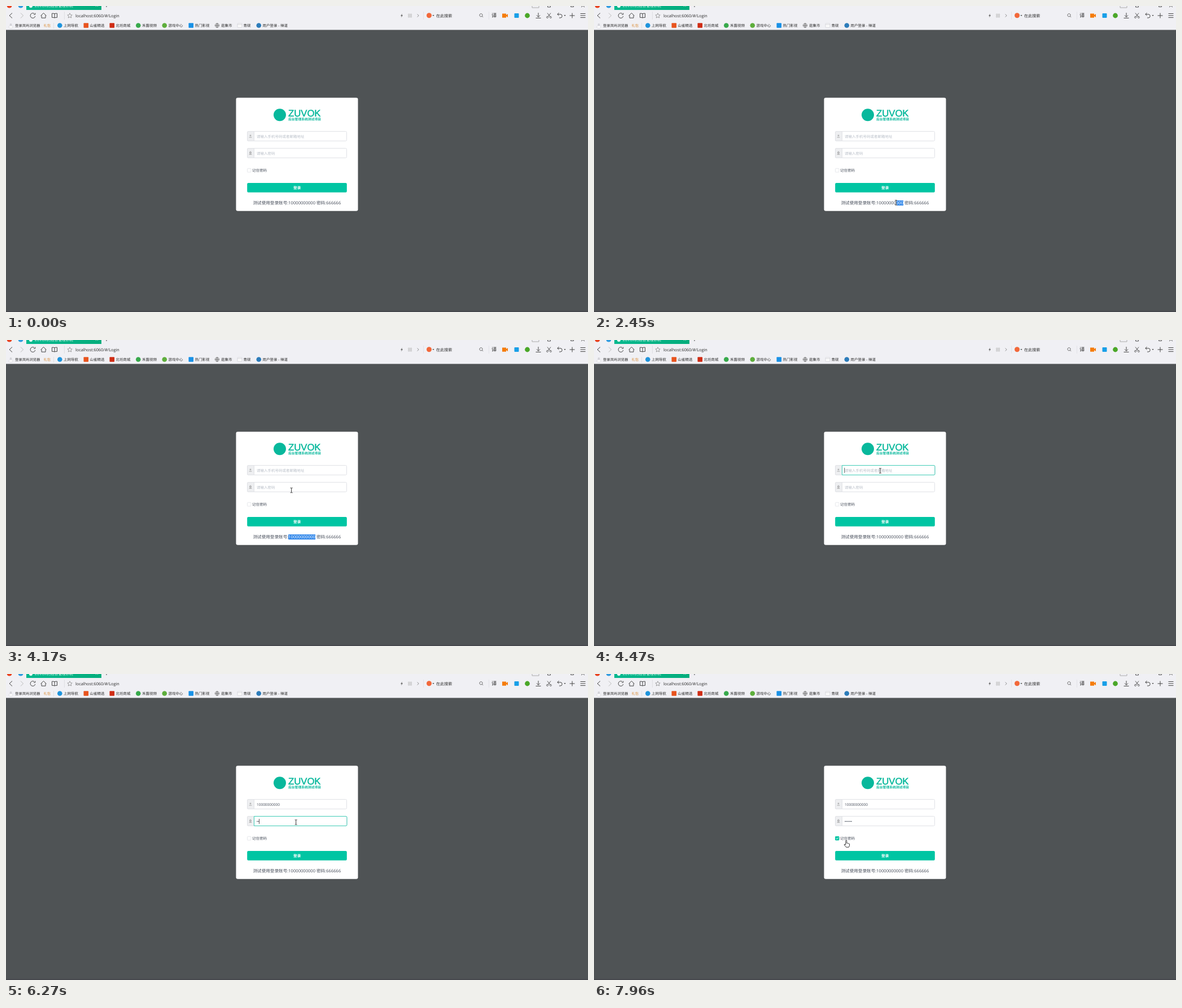
These frames come from a looping animation (1031x543 px, 8000 ms). An HTML page with a canvas:

```html
<!DOCTYPE html>
<html lang="zh-CN">
<head>
<meta charset="utf-8">
<style>
html, body { margin: 0; width: 100%; height: 100%; overflow: hidden; background: #4f5355; }
canvas { display: block; }
</style>
</head>
<body>
<canvas id="stage" width="1031" height="543"></canvas>
<script>
const ctx = document.getElementById('stage').getContext('2d');
const LOOP = 8000, STEP = 78;
const FONT = '"Open Sans", "Noto Sans CJK SC", "Noto Sans CJK", sans-serif';
const TEAL = '#00c5a3', BRAND = '#08b89c', INK = '#434a57', DARK = '#2c2c2c', PALE = '#b9bfc8';
const LINE = '#e0e2e6';
const PHONE = '10000000000';
const PHONE_X = 500.2, DIGIT = 4.35;

const clamp = v => Math.max(0, Math.min(1, v));
const ramp = (t, a, b) => clamp((t - a) / (b - a));
const mix = (a, b, k) => a + (b - a) * k;

function text(s, x, yMid, size, color, weight = 400, family = FONT) {
  ctx.font = `${weight} ${size}px ${family}`;
  ctx.fillStyle = color;
  ctx.fillText(s, x, yMid + size * 0.37);
}
function box(x, y, w, h, r, fill, stroke, width = 1) {
  ctx.beginPath();
  ctx.roundRect(x, y, w, h, r);
  if (fill) { ctx.fillStyle = fill; ctx.fill(); }
  if (stroke) { ctx.strokeStyle = stroke; ctx.lineWidth = width; ctx.stroke(); }
}
function dot(x, y, r, fill) {
  ctx.fillStyle = fill;
  ctx.beginPath();
  ctx.arc(x, y, r, 0, 7);
  ctx.fill();
}
function icon(x, y, path, color = '#444', width = 1, fill) {
  const p = new Path2D(path);
  ctx.save();
  ctx.translate(x, y);
  if (fill) { ctx.fillStyle = fill; ctx.fill(p); }
  if (color) { ctx.strokeStyle = color; ctx.lineWidth = width; ctx.stroke(p); }
  ctx.restore();
}

function drawTabs() {
  dot(6, -1, 4.5, '#e8401c');
  dot(26, -1, 4.5, '#2f9be0');
  const g = ctx.createLinearGradient(36, 0, 169, 0);
  g.addColorStop(0, '#06b98f');
  g.addColorStop(1, '#04ad7c');
  ctx.fillStyle = g;
  ctx.fillRect(36, 0, 133, 7);
  dot(44, 0, 3, '#fff');
  text('ZUVOK的后台管理系统', 51, -0.8, 6.6, '#fff');
  icon(161, -1, 'M-2-2L2 2M2-2L-2 2', '#fff', 0.8);
  icon(178, -1, 'M-3 0H3M0-3V3');
  icon(938, 0, 'M-6-3V3H6V-3', '#aaa');
  icon(962, 0, 'M-2.5-3V2H2.5V-3', '#555');
  icon(1003, 0, 'M-2.5-3V1.5H2.5V-3', '#555');
  icon(1022, 0, 'M-3-3L3 2M3-3L-3 2', '#555');
}

function drawToolbar() {
  const y = 17;
  icon(9, y, 'M2-4.5L-3 0L2 4.5');
  icon(28, y, 'M-2-4.5L2.5 0L-2 4.5', '#bbb');
  icon(47.5, y, 'M2.5-3.6A4.4 4.4 0 1 0 4.3 1M4.3-4.5V-2H1.6');
  icon(66.5, y, 'M-5 .3L0-4.5L5 .3M-3.5-.5V4.2H3.5V-.5');
  icon(86, y, 'M0-3.2Q-2-4.2-4.5-3.8V3.4Q-2 3 0 4Q2 3 4.5 3.4V-3.8Q2-4.2 0-3.2V4');
  icon(103.5, y, 'M0-7V7', '#dedee3');
  icon(113, y, 'M0-4.2L1.3-1.3L4.2-1L2 1L2.7 4L0 2.5L-2.7 4L-2 1L-4.2-1L-1.3-1.3Z', '#888', 0.8);
  text('localhost:6060/#/Login', 123, y + 0.2, 7.3, DARK);
  icon(701, y, 'M1-3.5L-2 .6H0L-1 3.5L2-.8H0Z', null, 0, '#555');
  icon(715.5, y, 'M-2.8-2.8H-.5V-.5H-2.8ZM.8-2.8H3V-.5H.8ZM-2.8.8H-.5V3H-2.8ZM.8.8H3V3H.8Z', '#bbb', 0.8);
  icon(730, y, 'M-1.5-2.5L1.2 0L-1.5 2.5', '#888', 0.9);
  icon(739.5, y, 'M0-7V7M116-7V7', '#e2e2e7');
  dot(749.5, 16.8, 4.5, '#f2683a');
  icon(757, y, 'M-1.6-1H1.6L0 1Z', null, 0, '#444');
  text('在此搜索', 762, y, 7.1, DARK);
  icon(841.5, 16.3, 'M2.6 0A2.6 2.6 0 1 1 2.6-.1M1.8 1.8L3.6 3.6', '#555', 0.9);
  text('译', 860, y, 9.4, '#222');
  icon(884, y, 'M-5-3.5H2V-1L5-3V3.2L2 1V3.8H-5Z', null, 0, '#f57c0b');
  box(900.5, 13, 8, 8, 1, '#189fe8');
  dot(923.5, 17, 4.4, '#4aa728');
  icon(943, y, 'M0-5V2.5M-3-.5L0 2.5L3-.5M-4.5 4.4H4.5');
  icon(962, y, 'M-3-4.5L2 2M3-4.5L-2 2M-1.5 3A1.5 1.5 0 1 1-1.5 2.9M4.3 3A1.5 1.5 0 1 1 4.3 2.9', '#444', 0.9);
  icon(981, y, 'M-1.5-5L-4.2-2.3L-1.5 0M-4.2-2.3H1A3 3 0 0 1 1 4H-1');
  icon(990, y, 'M-1.6-1H1.6L0 1Z', null, 0, '#444');
  icon(1003, y, 'M-4.5 0H4.5M0-4.5V4.5');
  icon(1022, y, 'M-4.5-3.5H4.5M-4.5 0H4.5M-4.5 3.5H4.5');
}

function drawBookmarks() {
  const y = 34.8, size = 6.5;
  dot(8.5, 33, 2, '#d3d3d8');
  box(5, 35.2, 7, 4, 2, '#fff', '#d3d3d8', 0.7);
  text('登录岚屿浏览器', 16, y - 0.4, 6.35, DARK);
  text('礼包', 66.5, y, 6.3, '#d9862a');
  icon(84.5, y, 'M0-5V5', '#dedee3');
  const marks = [['上网导航', 102, '#1e94dc', 1], ['山雀精选', 148.5, '#e8541e', 0],
    ['北坊商城', 194.5, '#cf2d15', 0], ['禾露视频', 241, '#37a94b', 1],
    ['游戏中心', 287.5, '#5eae3c', 1], ['热门影视', 334.5, '#1991e6', 0],
    ['逛集市', 381, null], ['青砚', 420.5, null], ['用户登录 - 禅道', 454.5, '#2c7cba', 1]];
  for (const [name, x, color, round] of marks) {
    text(name, x, y, size, DARK);
    if (!color) continue;
    if (round) dot(x - 6.7, y - 0.3, 4.3, color);
    else box(x - 11, 30.2, 8.6, 8.6, 1, color);
  }
  icon(374, 34.5, 'M3.7 0A3.7 3.7 0 1 1 3.7-.1M-3.7 0H3.7M0-3.7V3.7M0-3.7Q-3.4 0 0 3.7Q3.4 0 0-3.7', '#666', 0.7);
  box(410, 31, 8, 7, 1, '#fbfbfb', '#cfcfd4', 0.7);
  icon(410, 33, 'M0 0H8', '#cfcfd4', 0.8);
}

function drawInput(y, glow) {
  box(427.5, y + 0.5, 176, 17, 2, '#fff', LINE);
  box(427.5, y + 0.5, 12, 17, [2, 0, 0, 2], '#eeeff1', LINE);
  if (glow > 0.01)
    box(439.5, y + 0.5, 164.5, 17, [0, 2, 2, 0], null, `rgba(64,204,182,${glow})`);
}
function caret(x, y) {
  ctx.fillStyle = '#333';
  ctx.fillRect(x, y - 4.5, 0.8, 9);
}

function drawTitle() {
  dot(485, 193.3, 11, BRAND);
  text('ZUVOK', 500, 190.2, 16.7, BRAND, 400, '"Liberation Sans", Arial, sans-serif');
  ctx.strokeStyle = BRAND;
  ctx.lineWidth = 0.5;
  ctx.strokeText('ZUVOK', 500, 190.2 + 16.7 * 0.37);
  text('后台管理系统测试项目', 500, 201.2, 5.8, BRAND, 700);
}

function drawForm(t) {
  box(407.5, 162.7, 216, 201, 3, '#fff');
  drawTitle();

  const userGlow = ramp(t, 4310, 4400) - ramp(t, 5170, 5350);
  const passGlow = 0.6 * ramp(t, 4780, 4870) + 0.4 * ramp(t, 5170, 5250) - ramp(t, 7580, 7700);
  drawInput(222, userGlow);
  drawInput(252, passGlow);
  icon(433, 231, 'M-1-1.2A1 1 0 1 1 1-1.2A1 1 0 1 1-1-1.2M-2.4 2H2.4', '#888', 0.7);
  icon(433, 261, 'M-1.2-.5V-1.6A1.2 1.2 0 0 1 1.2-1.6V-.5M-2-.4H2M-1.6 1H1.6M-2.4 2.4H2.4', '#888', 0.7);

  const pasted = t >= 4690;
  text(pasted ? PHONE : '请输入手机号码或者邮箱地址', 444, 231.4, 6.5, pasted ? INK : PALE);
  if (t >= 4390 && t < 5170) caret(pasted ? 485.5 : 443.4, 231.3);

  const typed = [6040, 6190, 6410, 6580, 6810, 7040].filter(k => t >= k).length;
  if (!typed) text('请输入密码', 444, 261.5, 6.5, PALE);
  for (let i = 0; i < typed; i++) dot(445 + i * 2.2, 261.6, 0.8, INK);
  if ((t >= 5170 && t < 5730) || (t >= 6040 && t < 7580))
    caret(typed ? 443.8 + typed * 2.2 : 443.4, 261.5);

  const checked = t >= 7580;
  box(427.5, 288.3, 6.6, 6.6, 1, checked ? TEAL : '#fff', checked ? TEAL : LINE, 0.8);
  if (checked) icon(430.8, 291.6, 'M-2 0L-.5 1.5L2-1.4', '#fff', 1);
  text('记住密码', 436, 291.5, 6.5, INK);
  box(427.2, 314, 176.6, 16.7, 2, TEAL);
  text('登录', 509, 322.2, 6.7, '#fff', 700);
  text(`测试使用登录账号:${PHONE} 密码:666666`, 437.5, 349.5, 7.6, INK);
}

function drawSelection(t, x) {
  if (t < 2220 || t >= 4390) return;
  const first = t >= 3000 ? 0 : Math.max(0, Math.round((x - PHONE_X) / DIGIT));
  const left = PHONE_X + first * DIGIT, right = PHONE_X + PHONE.length * DIGIT;
  ctx.fillStyle = '#2f86ea';
  ctx.fillRect(left, 345, right - left, 9);
  text(PHONE.slice(first), left, 349.5, 7.6, '#fff');
}
function drawPopup(t) {
  if (t < 3480 || t >= 4010) return;
  ctx.fillStyle = 'rgba(0,0,0,.25)';
  ctx.fillRect(502, 326, 62, 16);
  box(500.5, 324.5, 62, 16.5, 0, '#fff', '#999', 0.8);
  icon(531.5, 325, 'M0 0V16', '#bbb', 0.8);
  text('搜索', 508, 333, 7.7, DARK);
  text('复制', 539, 333, 7.7, DARK);
}

// Pointer legs: start, end, x0, y0, x1, y1
const LEGS = [
  [190, 980, 985, 560, 560.5, 351],
  [1060, 1300, 560.5, 351, 554, 349.5],
  [1300, 1380, 554, 349.5, 553, 349],
  [1520, 1840, 553, 349, 549.5, 348.7],
  [1980, 1990, 549.5, 348.7, 548.5, 348.7],
  [2220, 3000, 548.5, 348.7, 503.5, 349.3],
  [3080, 3150, 503.5, 349.3, 502.5, 349.3],
  [3860, 4470, 502.5, 349.3, 507, 232],
  [4690, 4870, 507, 232, 511, 260],
  [5170, 5260, 511, 260, 513.7, 263],
  [7040, 7270, 513.7, 263, 448.3, 296],
  [7350, 7430, 448.3, 296, 446.8, 295.3]
];
function pointerAt(t) {
  if (t < LEGS[0][0]) return null;
  const [a, b, x0, y0, x1, y1] = LEGS.filter(leg => t >= leg[0]).pop();
  const k = clamp((Math.floor((t - a) / STEP) + 1) * STEP / (b - a));
  const e = a === 2220 ? k : 1 - (1 - k) ** 1.7;
  return [mix(x0, x1, e), mix(y0, y1, e)];
}
function drawPointer(x, y) {
  const within = (l, t, r, b) => x > l && x < r && y > t && y < b;
  const field = within(439, 222, 604, 240) || within(439, 252, 604, 270);
  if (field || within(437, 344, 594, 355)) {
    const beam = 'M-2-4.2H-.6L0-3.8L.6-4.2H2M-2 4.2H-.6L0 3.8L.6 4.2H2M0-3.8V3.8';
    icon(x, y, beam, 'rgba(255,255,255,.7)', 1.6);
    icon(x, y, beam, '#222', 0.9);
  } else if (within(427, 314, 604, 331) || within(427, 286, 463, 298)) {
    icon(x, y, 'M-1 1Q-1 0 0 0Q1 0 1 1V5Q2 4 2.8 5.2Q3.8 4.6 4.4 5.8Q5.6 5.4 5.8 6.6V8.6Q5.6 10.5 4.5 12H-.2Q-1.5 10.4-3.6 7.6Q-3.4 5.8-1 7.6Z', '#222', 0.9, '#fff');
  } else {
    icon(x, y, 'M0 0V10.5L2.5 8.2L4.1 12L5.7 11.3L4.1 7.6H7.5Z', '#222', 0.7, '#fff');
  }
}

function draw(t) {
  ctx.fillStyle = '#4f5355';
  ctx.fillRect(0, 0, 1031, 543);
  ctx.fillStyle = '#f0f0f4';
  ctx.fillRect(0, 0, 1031, 42.4);
  ctx.fillStyle = '#46484d';
  ctx.fillRect(0, 541, 1031, 2);
  drawTabs();
  drawToolbar();
  drawBookmarks();
  drawForm(t);
  const pointer = pointerAt(t);
  if (pointer) drawSelection(t, pointer[0]);
  drawPopup(t);
  if (pointer) drawPointer(...pointer);
}

ctx.textRendering = 'geometricPrecision';
const start = performance.now();
function tick() {
  draw((performance.now() - start) % LOOP);
  requestAnimationFrame(tick);
}
tick();
</script>
</body>
</html>
```
